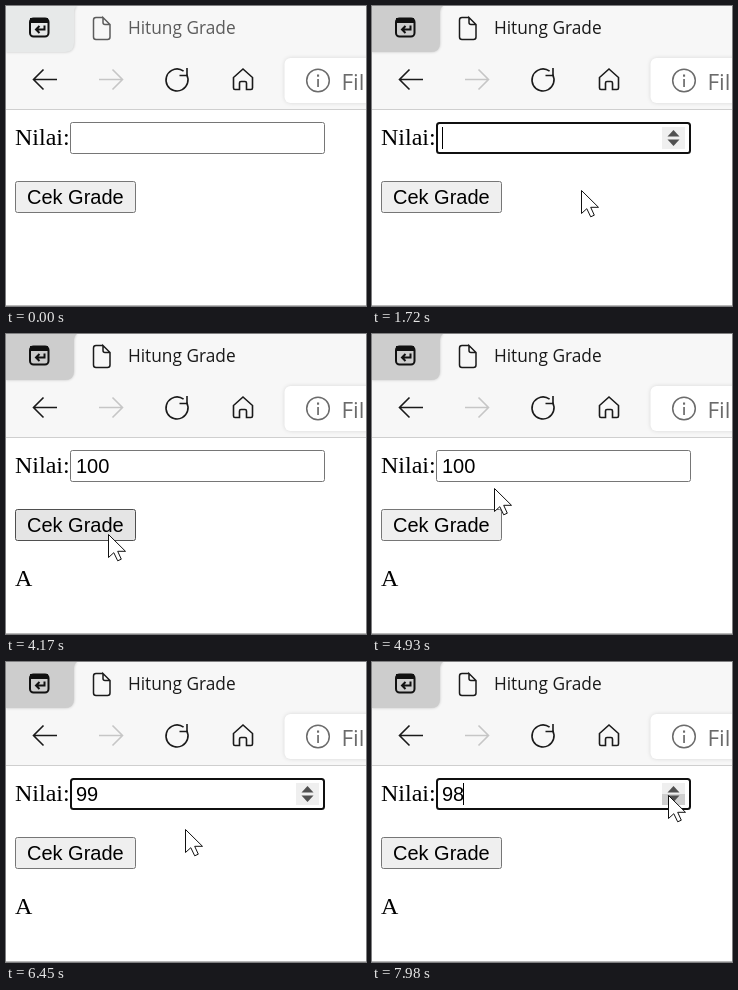
An HTML page with a canvas for the animation above (8 s loop, 360 px wide and 300 px high).

```html
<!DOCTYPE html>
<html lang="id">
<head>
<meta charset="utf-8">
<title>Hitung Grade</title>
<style>
html, body { margin: 0; width: 100%; height: 100%; overflow: hidden; background: #fff; }
canvas { display: block; width: 360px; height: 300px; }
</style>
</head>
<body>
<canvas id="stage"></canvas>
<script>
const LOOP = 8000;
const SANS = '"Liberation Sans", Arial, sans-serif';
const SERIF = '"Liberation Serif", "Times New Roman", serif';
const UI = '"Open Sans", "Noto Sans", sans-serif';

const canvas = document.getElementById('stage');
const ctx = canvas.getContext('2d');
const dpr = window.devicePixelRatio || 1;
canvas.width = 360 * dpr;
canvas.height = 300 * dpr;

// Pointer path: time reached, x, y, number of steps taken to get there
const path = [
  [520, 222, 258, 1],
  [1100, 205, 139, 8],
  [1420, 207, 141, 1],
  [1720, 209, 184, 1],
  [2670, 286, 245, 1],
  [2720, 282, 244, 1],
  [3040, 282, 244, 1],
  [3290, 232, 232, 4],
  [3740, 102, 200, 6],
  [4560, 102, 200, 1],
  [5000, 130, 135, 7],
  [5250, 129, 135, 1],
  [5320, 130, 135, 1],
  [5510, 130, 135, 1],
  [5760, 297, 136, 4],
  [5940, 297, 136, 1],
  [6700, 112, 184, 11],
  [6800, 112, 185, 1],
  [7090, 150, 164, 4],
  [7540, 293, 133, 7],
  [7610, 294, 133, 1],
  [7680, 296, 133, 1]
];
const values = [[0, ''], [2420, '1'], [2670, '10'], [3100, '100'], [5940, '99'], [7930, '98']];
const caretResets = [1420, 2420, 2670, 3100, 5940, 7930];
const focusSpans = [[1350, 4120], [5940, 6770], [7930, LOOP]];
const pressSpans = [[4120, 4170], [6770, 6840]];
const within = (t, spans) => spans.some(([a, b]) => t >= a && t < b);

function pointerAt(t) {
  if (t < path[0][0]) return null;
  const i = path.findIndex(k => k[0] > t);
  if (i < 0) {
    const [, x, y] = path[path.length - 1];
    return { x, y };
  }
  const [t0, x0, y0] = path[i - 1];
  const [t1, x1, y1, n] = path[i];
  const u = Math.floor((t - t0) / (t1 - t0) * n + 1e-6) / n;
  return { x: Math.round(x0 + (x1 - x0) * u), y: Math.round(y0 + (y1 - y0) * u) };
}

function text(s, x, y, font, color = '#000') {
  ctx.font = font;
  ctx.fillStyle = color;
  ctx.fillText(s, x, y);
}

function box(x, y, w, h, r, fill, stroke, width = 1) {
  ctx.beginPath();
  ctx.roundRect(x, y, w, h, r);
  if (fill) { ctx.fillStyle = fill; ctx.fill(); }
  if (stroke) { ctx.strokeStyle = stroke; ctx.lineWidth = width; ctx.stroke(); }
}

function rect(x, y, w, h, color) {
  ctx.fillStyle = color;
  ctx.fillRect(x, y, w, h);
}

function line(d, color, width) {
  ctx.strokeStyle = color;
  ctx.lineWidth = width;
  ctx.stroke(new Path2D(d));
}

function shape(d, color) {
  ctx.fillStyle = color;
  ctx.fill(new Path2D(d));
}

function drawTabs(active) {
  rect(0, 0, 360, 103, '#f7f7f7');
  ctx.save();
  ctx.shadowColor = 'rgba(0,0,0,.22)';
  ctx.shadowBlur = 3 * dpr;
  shape('M0 0H71Q68 2 68 6V37Q68 46 59 46H0Z', active ? '#cdcdcd' : '#e7e9e9');
  ctx.restore();

  // vertical tabs icon
  box(24, 12.5, 18.5, 18, 3.5, null, '#111', 2);
  rect(24, 12, 18, 5, '#111');
  line('M38.5 19.5V23.5H30M33.5 20L30 23.5L33.5 27', '#111', 2);

  const ink = active ? '#1a1a1a' : '#5c5c5c';
  line('M97 11.5H90Q87.5 11.5 87.5 14V31Q87.5 33.5 90 33.5H101.5Q104 33.5 104 31V18.5L97 11.5V16.5Q97 18.5 99 18.5H104', ink, 1.5);
  text('Hitung Grade', 122, 28, '17.3px ' + UI, ink);
}

function drawToolbar() {
  line('M51 73.5H28M37.5 63.5L27.5 73.5L37.5 83.5', '#1a1a1a', 1.6);
  line('M93 73.5H116M106.5 63.5L116.5 73.5L106.5 83.5', '#c6c6c6', 1.6);
  ctx.beginPath();
  ctx.arc(171, 74, 11, -0.5, Math.PI * 1.8 - 0.3, false);
  ctx.strokeStyle = '#1a1a1a';
  ctx.lineWidth = 1.6;
  ctx.stroke();
  line('M181 62V69.5H173.5', '#1a1a1a', 1.6);
  line('M237 63L246.5 71.5V82Q246.5 83.5 245 83.5H240.5V77Q240.5 75.5 239 75.5H235Q233.5 75.5 233.5 77V83.5H229Q227.5 83.5 227.5 82V71.5Z', '#1a1a1a', 1.6);

  ctx.save();
  ctx.shadowColor = 'rgba(0,0,0,.13)';
  ctx.shadowBlur = 4 * dpr;
  box(278.5, 52, 100, 45, 6, '#fff');
  ctx.restore();
  ctx.beginPath();
  ctx.arc(312, 74.5, 11.3, 0, Math.PI * 2);
  ctx.strokeStyle = '#6b6b6b';
  ctx.lineWidth = 1.5;
  ctx.stroke();
  rect(311.2, 73, 1.7, 8, '#6b6b6b');
  rect(311, 68.5, 2.1, 2.2, '#6b6b6b');
  text('Fil', 335.5, 84, '22.5px ' + UI, '#6b6b6b');
  rect(0, 103, 360, 1, '#cfcfcf');
}

function drawInput(value, focused, hover, overDown, caretOn) {
  if (focused) box(65, 117, 253, 30, 2.5, '#fff', '#101010', 2);
  else box(64.5, 116.5, 254, 31, 2, '#fff', '#767676', 1);
  text(value, 70, 139, '20px ' + SANS);
  if (focused && caretOn) {
    rect(Math.floor(70 + ctx.measureText(value).width - (value ? 0.9 : 0)), 121, 1, 22, '#000');
  }
  if (focused || hover) {
    rect(290, 121, 23, 22, '#efefef');
    if (overDown) rect(290, 132, 23, 11, '#cfcfcf');
    shape('M301.5 124L307.5 130.5H295.5Z', '#505050');
    shape('M301.5 140L307.5 133.5H295.5Z', '#505050');
  }
}

function drawButton(hover, pressed) {
  const fill = pressed ? '#f5f5f5' : hover ? '#e5e5e5' : '#efefef';
  const edge = pressed ? '#8d8d8d' : hover ? '#4f4f4f' : '#767676';
  box(9.5, 175.5, 120, 31, 2, fill, edge, 1);
  text('Cek Grade', 21, 198, '20px ' + SANS);
}

function drawPointer(p, beam) {
  ctx.save();
  ctx.translate(p.x + 0.5, p.y + 0.5);
  if (beam) {
    line('M0 -11V11M-5 -12H-2Q0 -12 0 -10Q0 -12 2 -12H5M-5 12H-2Q0 12 0 10Q0 12 2 12H5', '#000', 1);
  } else {
    const arrow = 'M0 0V23L5.3 18.2L9.2 26.3L12.8 24.7L9.2 16.8H17Z';
    shape(arrow, '#fff');
    line(arrow, '#111', 1);
  }
  ctx.restore();
}

function draw(t) {
  const p = pointerAt(t);
  const over = (x0, y0, x1, y1) => !!p && p.x >= x0 && p.x < x1 && p.y >= y0 && p.y < y1;
  const hover = over(64, 116, 319, 148);
  const focused = within(t, focusSpans);
  const value = values.filter(v => v[0] <= t).pop()[1];
  const reset = caretResets.filter(r => r <= t).pop() || t;

  ctx.setTransform(dpr, 0, 0, dpr, 0, 0);
  rect(0, 0, 360, 300, '#fff');
  drawTabs(t >= 1350);
  drawToolbar();
  text('Nilai:', 9, 139, '24px ' + SERIF);
  drawInput(value, focused, hover, over(290, 132, 313, 144), (t - reset) % 1000 < 500);
  drawButton(over(9, 175, 130, 207), within(t, pressSpans));
  if (t >= 4170) text('A', 9, 252, '24px ' + SERIF);
  rect(0, 299, 360, 1, '#b8b8b8');
  if (p) drawPointer(p, hover && p.x < 290);
}

function tick(now) {
  draw(now % LOOP);
  requestAnimationFrame(tick);
}
draw(0);
requestAnimationFrame(tick);
</script>
</body>
</html>
```
